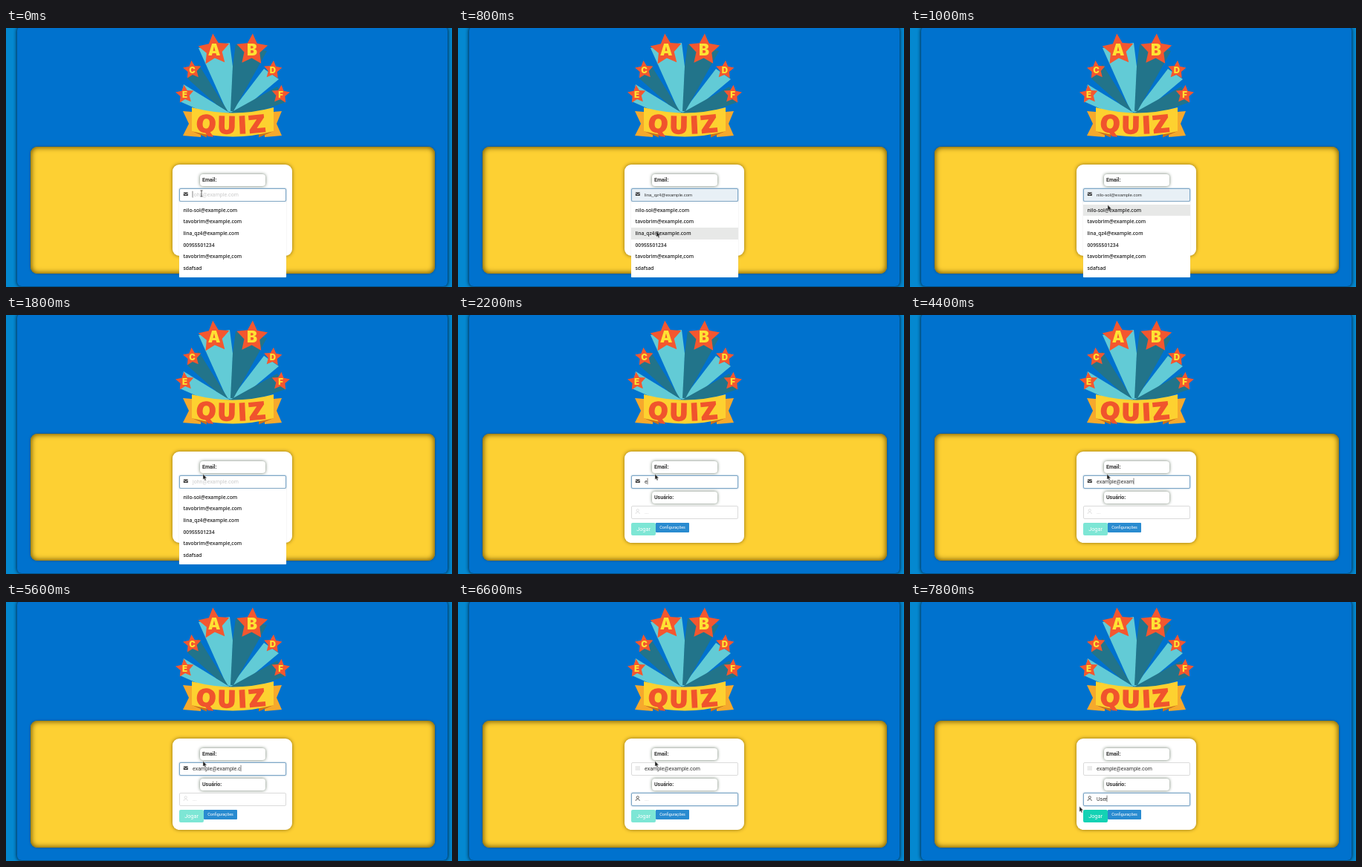
Recreate the animation shown at these times as an HTML page. Size 600x349 px, loop 8 s.

```html
<!DOCTYPE html>
<html lang="pt">
<head>
<meta charset="utf-8">
<title>Quiz</title>
<style>
html, body { margin: 0; width: 100%; height: 100%; overflow: hidden; }
body { position: relative; background: #0488d0; font: 7px/1 Roboto, sans-serif; color: #333; }
div, svg { position: absolute; box-sizing: border-box; }
svg { left: 0; top: 0; }
.page { left: 15px; top: -2px; width: 579px; height: 350px; border-radius: 6px; background: #0072ce; box-shadow: 0 0 4px 1px #022f55; }
.panel { left: 33px; top: 160px; width: 544px; height: 171px; border-radius: 9px; background: #fdd033; box-shadow: inset 0 0 7px 1px #6b5000, 0 0 3px #1c4560; }
.card { left: 224px; top: 184px; width: 161px; height: 122.5px; border-radius: 9px; background: #fff; box-shadow: 0 0 5px #8a6a10; }
.label { left: 261px; width: 87.5px; height: 16px; border-radius: 4px; background: #fff; box-shadow: 0 0 4px #697868; padding-left: 3px; line-height: 16px; font-weight: 600; }
.field { left: 233px; width: 144px; height: 18px; border: 1px solid #dbdbdb; border-radius: 2px; background: #fff; padding-left: 17px; line-height: 16px; white-space: pre; }
.field.focus { border-color: #7ba5c6; box-shadow: 0 0 2px #7ba5c6; }
.field.preview { background: #e8f0f6; font: 6px/17px "Liberation Sans", Arial, sans-serif; }
.field span { color: #cbcbcb; }
.field i { display: inline-block; width: 0; height: 8px; vertical-align: -1px; box-shadow: 0 0 0 .3px #333; }
.button { left: 233px; top: 280px; width: 33px; height: 17px; border-radius: 2px; background: #14d2b4; color: #fff; text-align: center; line-height: 17px; font-size: 7.3px; }
.config { left: 266px; width: 45px; height: 13px; border-radius: 1px; background: #298bd0; line-height: 13px; font-size: 5.4px; }
#list { left: 233px; top: 234px; width: 144px; height: 101.5px; padding-top: 3.6px; border-radius: 1px; background: #fff; box-shadow: 0 0 1px #aaa; font: 600 6.7px/15.7px "Open Sans", sans-serif; color: #222; }
#list p { margin: 0; height: 15.7px; padding-left: 5.5px; }
#list .hot { background: #e7e8e7; }
</style>
</head>
<body>
<div class="page"></div>
<div class="panel"></div>
<div class="card"></div>
<svg id="art" width="600" height="349">
  <g fill="#62cbd6">
    <path d="M234 99L239 76L301 114L268 114Z"/>
    <path d="M367 69L347 55L302 114L318 110Z"/>
    <path d="M259 27L301 20L305 52L304 114L297 112Z"/>
  </g>
  <g fill="#22748a">
    <path d="M244 68L259 49L299 113L283 103Z"/>
    <path d="M376 100L365 79L302 114L335 114Z"/>
    <path d="M309 22L351 31L306 112L302 112L305 52Z"/>
  </g>
  <path fill="#f6a92c" d="M238 112L262 114V147L238 145L246 129ZM371 112L348 114V147L371 145L364 129Z"/>
  <path fill="#c9701c" d="M250 139L270 142V147.5ZM360 139L340 142V147.5Z"/>
  <path fill="#fdd130" d="M250 107Q305 122 360 107V139Q305 154 250 139Z"/>
  <path id="arc" fill="none" d="M255 138.5Q305 146 358 138"/>
  <text fill="#f0542d" stroke="#f0542d" stroke-width="1.8" letter-spacing="3.2"
    font-family="DejaVu Sans, sans-serif" font-weight="bold" font-size="31"><textPath href="#arc">QUIZ</textPath></text>
</svg>
<div class="label" style="top:197px">Email:</div>
<div class="field" id="mail" style="top:216px"></div>
<div class="label" style="top:238px">Usuário:</div>
<div class="field" id="user" style="top:257px"></div>
<div class="button" id="play">Jogar</div>
<div class="button config">Configurações</div>
<div id="list"></div>
<svg width="600" height="349">
  <path id="envelope" d="M238.8 222.2V221.5H244.8V222.2L241.8 224.1ZM238.8 223L241.8 224.9L244.8 223V226H238.8Z" fill="#333"/>
  <path id="lines" d="M238.5 222H245M238.5 224H245M238.5 226H245" stroke="#d3d3d3" stroke-width=".9"/>
  <g id="person" fill="none" stroke-width=".8">
    <circle cx="241.7" cy="263.2" r="1.6"/>
    <path d="M239 268Q239 265.6 241.7 265.6T244.4 268"/>
  </g>
  <path id="beam" d="M-1.5 -4H1.5M0 -4V4M-1.5 4H1.5" fill="none" stroke="#333" stroke-width=".8"/>
  <path id="arrow" d="M0 0V7.2L1.6 5.8L2.8 8.4L4 7.8L2.9 5.3H5.1Z" fill="#222" stroke="#ddd" stroke-width=".4"/>
</svg>
<script>
const STEP = 200, LOOP = 8000;
const $ = id => document.getElementById(id);

const options = ["nilo-sol@example.com", "tavobrim@example.com", "lina_qz4@example.com",
  "00955501234", "tavobrim@example,com", "sdafsad"];
const address = "example@example.com", name = "User";
// characters typed at each step, from 2200 ms on
const typed = [1, 2, 3, 3, 5, 6, 6, 7, 7, 8, 10, 12, 13, 14, 15, 15, 16, 17, 18, 19];
// pointer path: time, x, y
const path = [[0, 263, 223], [200, 264, 240], [600, 268, 310], [1000, 266, 238.5], [1200, 265, 225],
  [1400, 265, 222], [1800, 265, 214.5], [7200, 265, 214.5], [7600, 178, 217], [7800, 228, 275.5]];

$("list").innerHTML = options.map(o => `<p>${o}</p>`).join("");
const rows = [...$("list").children];

function star(letter, x, y, r, size, tilt) {
  const points = Array.from({ length: 10 }, (_, i) => {
    const a = i * Math.PI / 5 + tilt, d = i % 2 ? r * .5 : r;
    return (x + d * Math.sin(a)) + "," + (y - d * Math.cos(a));
  });
  $("art").innerHTML += `<polygon points="${points.join(" ")}" fill="#f4572f"/>
    <text x="${x}" y="${y + size * .35}" text-anchor="middle" fill="#fee233"
      font-family="Inter, sans-serif" font-weight="900" font-size="${size}">${letter}</text>`;
}
star("A", 280, 29.5, 22, 21, -.08);
star("B", 331, 29.5, 22, 21, .04);
star("C", 250.5, 56.5, 12.8, 11.5, -.08);
star("D", 359, 56.5, 12.8, 11.5, .08);
star("E", 240.5, 89.5, 12.8, 11.5, -.08);
star("F", 369.5, 89.5, 12.8, 11.5, .08);

function pointer(t) {
  const i = path.findIndex(p => p[0] > t);
  if (i < 0) return path[path.length - 1].slice(1);
  const [t0, x0, y0] = path[i - 1], [t1, x1, y1] = path[i], k = (t - t0) / (t1 - t0);
  return [x0 + (x1 - x0) * k, y0 + (y1 - y0) * k];
}

function field(el, value, hint, focus, caret) {
  const bar = focus && caret ? "<i></i>" : "";
  el.innerHTML = value ? value + bar : bar + `<span>${hint}</span>`;
  el.classList.toggle("focus", focus);
}

const show = (id, on) => $(id).style.display = on ? "" : "none";

function draw(t) {
  const step = Math.floor(t / STEP);
  const [x, y] = pointer(t);
  const open = t < 2200, onMail = t < 6200;
  const row = open && y > 237.6 ? Math.min(5, Math.floor((y - 237.6) / 15.7)) : -1;
  const mail = address.slice(0, open ? 0 : typed[Math.min(step - 11, typed.length - 1)]);
  const user = name.slice(0, Math.max(0, step - 33));
  const caret = !(t >= 1600 && open) && !(t >= 6600 && !user) && row < 0;

  rows.forEach((r, i) => r.classList.toggle("hot", i === row));
  show("list", open);
  field($("mail"), row < 0 ? mail : options[row], "john@example.com", onMail, caret);
  $("mail").classList.toggle("preview", row >= 0);
  field($("user"), user, "...", !onMail, caret);
  show("envelope", onMail);
  show("lines", !onMail);
  show("person", !open);
  $("person").setAttribute("stroke", onMail ? "#dbdbdb" : "#444");
  $("play").style.opacity = user ? 1 : .55;

  const beam = y > 217.5 && y < 234;
  show("beam", beam);
  show("arrow", !beam);
  $(beam ? "beam" : "arrow").setAttribute("transform", `translate(${x} ${y})`);
}

const start = performance.now();
function tick() {
  const t = (performance.now() - start) % LOOP;
  draw(Math.floor(t / STEP) * STEP);
  requestAnimationFrame(tick);
}
tick();
</script>
</body>
</html>
```
